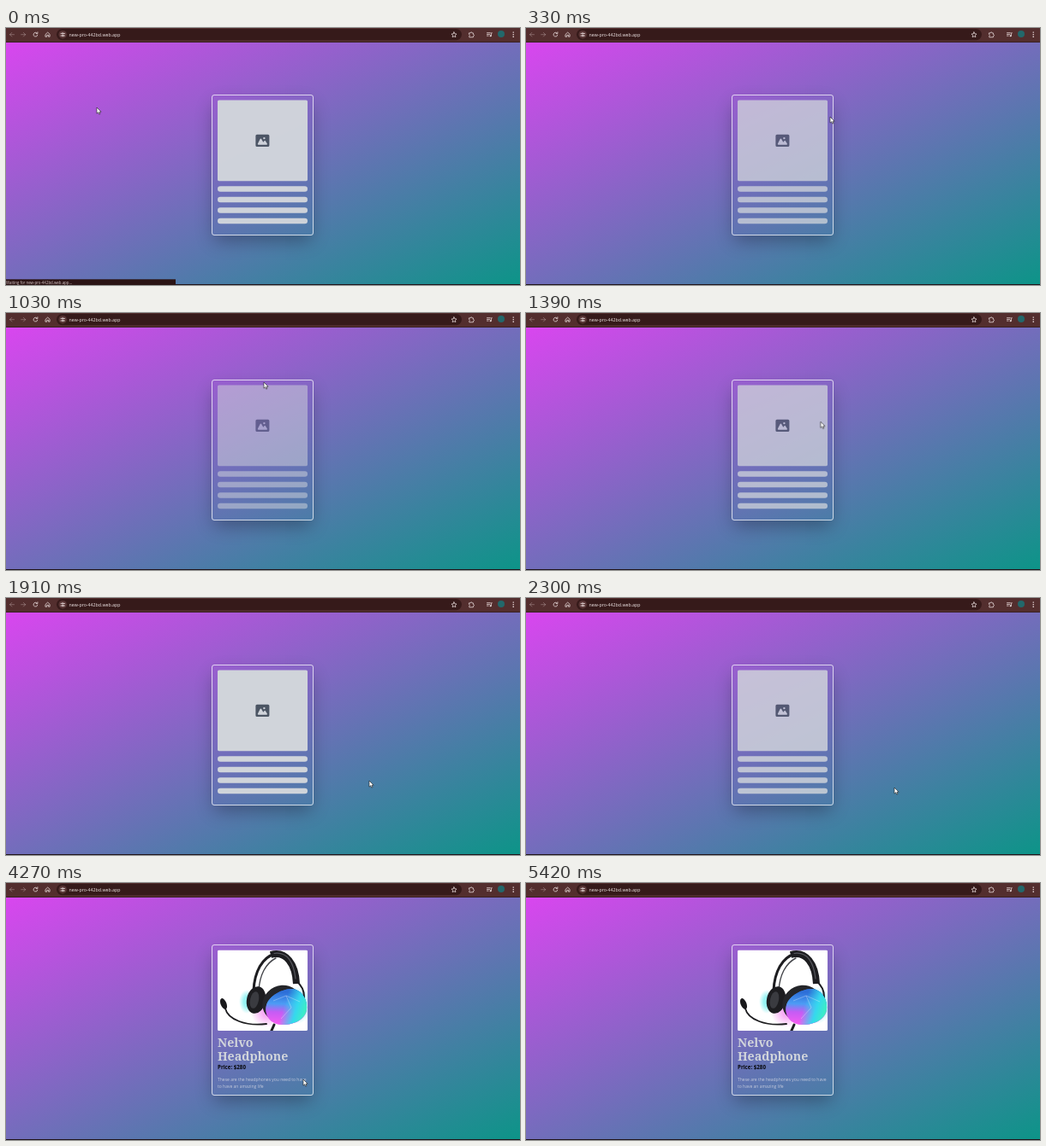
An HTML page that plays this animation: 600 px wide and 301 px high, repeating every 5.45 s.

```html
<!DOCTYPE html>
<html lang="en">
<head>
<meta charset="utf-8">
<title>Product card loading</title>
<style>
  :root { --loop: 5450ms; }
  html, body { margin: 0; width: 100%; height: 100%; overflow: hidden; }
  body { position: relative; background: #20141a; }
  svg { position: absolute; left: 0; top: 0; width: 600px; height: 301px; }
  text { font-family: "Open Sans", "Noto Sans", sans-serif; white-space: pre; }

  .page {
    position: absolute; left: 0; top: 16.5px; width: 600px; height: 283.5px;
    background: linear-gradient(to bottom right, #d946ef, #0d9488);
  }
  .card {
    position: absolute; left: 240.3px; width: 118.4px; box-sizing: border-box;
    border: 1px solid rgba(255, 255, 255, .72); border-radius: 3px;
    box-shadow: 0 9px 20px -3px rgba(0, 0, 0, .3);
  }
  .card.empty { top: 78px; height: 164.5px; }
  .card.full { top: 71.5px; height: 177px; }

  .loading { animation: loading var(--loop) step-end infinite; }
  .loaded { animation: loaded var(--loop) step-end infinite; }
  .status { animation: status var(--loop) step-end infinite; }
  .pulse { animation: pulse var(--loop) cubic-bezier(.4, 0, .6, 1) infinite; }
  .photo { animation: reveal var(--loop) steps(5, jump-both) infinite; }
  .cursor { animation: move var(--loop) ease-in-out infinite; }

  @keyframes loading { 0% { visibility: visible; } 43.85%, 100% { visibility: hidden; } }
  @keyframes loaded { 0% { visibility: hidden; } 43.85%, 100% { visibility: visible; } }
  @keyframes status { 0% { visibility: visible; } 2.75%, 100% { visibility: hidden; } }
  @keyframes pulse {
    0% { opacity: .98; animation-timing-function: cubic-bezier(.25, .15, .6, 1); }
    16.5% { opacity: .5; }
    34.86% { opacity: 1; }
    53.2%, 100% { opacity: .5; }
  }
  @keyframes reveal {
    0%, 53.94% { clip-path: inset(0 0 100% 0); }
    58.8%, 100% { clip-path: inset(0 0 0 0); }
  }
  @keyframes move {
    0%, 1.1% { transform: translate(106px, 93px); }
    6.05%, 7.7% { transform: translate(355px, 104px); }
    18.9% { transform: translate(301px, 81px); }
    35.05% { transform: translate(424px, 214px); }
    42.2% { transform: translate(430px, 222px); }
    53.2% { transform: translate(470px, 305px); }
    53.3%, 66.8% { transform: translate(425px, 305px); }
    71.56% { transform: translate(395px, 150px); }
    76.7% { transform: translate(349px, 226px); }
    78.35% { transform: translate(347px, 230px); }
    86.2%, 100% { transform: translate(360px, -14px); }
  }

  .bar-icons { fill: none; stroke: #e8dada; stroke-width: .8; stroke-linecap: round; stroke-linejoin: round; }
  .dim { opacity: .4; }
  .solid { fill: #e8dada; stroke: none; }
  .title { font: bold 14.2px "Noto Serif", "DejaVu Serif", serif; fill: #d1d5db; }
  .price { font-size: 6.2px; font-weight: 700; fill: #08080c; }
  .note { font-size: 5px; fill: #c3c9dc; }
</style>
</head>
<body>
<div class="page"></div>
<div class="card empty loading"></div>
<div class="card full loaded"></div>

<svg viewBox="0 0 600 301">
  <defs>
    <linearGradient id="shell" x1=".45" y1="0" x2=".4" y2="1">
      <stop offset=".1" stop-color="#2d6fd8"/>
      <stop offset=".42" stop-color="#4c9cf5"/>
      <stop offset=".65" stop-color="#c45cf4"/>
      <stop offset="1" stop-color="#f65cf0"/>
    </linearGradient>
    <linearGradient id="side" x1=".45" y1=".45" x2="1" y2=".6">
      <stop offset="0" stop-color="#35d8ee" stop-opacity="0"/>
      <stop offset=".55" stop-color="#35d8ee"/>
      <stop offset="1" stop-color="#3ff0c0"/>
    </linearGradient>
    <radialGradient id="cyanGlow">
      <stop offset=".4" stop-color="#7df0f0" stop-opacity=".8"/>
      <stop offset="1" stop-color="#7df0f0" stop-opacity="0"/>
    </radialGradient>
    <radialGradient id="pinkGlow">
      <stop offset=".3" stop-color="#f79af2" stop-opacity=".8"/>
      <stop offset="1" stop-color="#f79af2" stop-opacity="0"/>
    </radialGradient>
    <clipPath id="frame"><rect x="247" y="78.5" width="105" height="94.5" rx="1.6"/></clipPath>
  </defs>

  <!-- browser bar -->
  <rect width="600" height="16.5" fill="#532e2e"/>
  <rect x="59" y="1" width="473" height="13.2" rx="6.6" fill="#361a1a"/>
  <circle cx="66.2" cy="7.7" r="4.8" fill="#573434"/>
  <text x="73.6" y="9.7" font-size="5.25" fill="#f3eaea">new-pro-442bd.web.app</text>
  <g class="bar-icons">
    <path class="dim" d="M9.5 7.7H4.5M6.8 5.4 4.5 7.7 6.8 10M17.7 7.7h5M20.4 5.4l2.3 2.3-2.3 2.3"/>
    <path d="M36.8 8.2A2.4 2.4 0 1 1 36 5.8M36.9 4.8v1.8h-1.8"/>
    <path d="M46.3 7.3 48.7 5.1 51.1 7.3V10.2H49.6V8.3H47.8V10.2H46.3Z"/>
    <path d="M64 6.4h1.2M67.4 6.4h1.3M63.9 9h1.3M67.2 9h1.3"/>
    <circle cx="66.2" cy="6.4" r=".8"/><circle cx="66.2" cy="9" r=".8"/>
    <path d="M523 4.9l.9 1.9 2.1.3-1.5 1.5.3 2.1-1.8-1-1.8 1 .3-2.1-1.5-1.5 2.1-.3Z"/>
    <path d="M540.8 5.9h1.4a1 1 0 0 1 2 0h1.2v1.6a1 1 0 0 1 0 2v1.3h-4.6V9.2a1 1 0 0 0 0-1.7Z"/>
    <path d="M561.5 5.7h3.8M561.5 7.4h3.2M561.5 9.1h1.7M566.4 9.2V5.8h1"/>
    <circle class="solid" cx="565.6" cy="9.3" r="1"/>
    <path class="solid" d="M591.6 4.4h1.3v1.3h-1.3ZM591.6 7h1.3v1.3h-1.3ZM591.6 9.6h1.3v1.3h-1.3Z"/>
  </g>
  <circle cx="578" cy="7" r="4" fill="#23686b"/>

  <!-- placeholder -->
  <g class="loading">
    <g class="pulse" fill="#d1d5db">
      <rect x="247" y="84.5" width="105" height="94.7" rx="1.6"/>
      <rect x="247" y="185.2" width="105" height="6.5" rx="3.25"/>
      <rect x="247" y="197.8" width="105" height="6.5" rx="3.25"/>
      <rect x="247" y="210.3" width="105" height="6.5" rx="3.25"/>
      <rect x="247" y="222.8" width="105" height="6.5" rx="3.25"/>
      <path fill="#4b5563" fill-rule="evenodd" transform="translate(291.4 124.7) scale(.8)"
        d="M18 0H2a2 2 0 0 0-2 2v14a2 2 0 0 0 2 2h16a2 2 0 0 0 2-2V2a2 2 0 0 0-2-2ZM12.5 4a1.5 1.5 0 1 1 0 3 1.5 1.5 0 0 1 0-3ZM16.9 14.5A1 1 0 0 1 16 15H4a1 1 0 0 1-.9-1.4l3.5-7a1 1 0 0 1 1.8-.1l2.7 4.8 1.6-1.9a1 1 0 0 1 1.6.1l2.5 4a1 1 0 0 1 .1 1Z"/>
    </g>
  </g>

  <!-- product -->
  <g class="loaded">
    <g class="photo">
      <g clip-path="url(#frame)">
        <rect x="247" y="78.5" width="105" height="94.5" fill="#fff"/>
        <ellipse cx="339" cy="143" rx="19" ry="22" fill="url(#cyanGlow)"/>
        <ellipse cx="305" cy="152" rx="19" ry="17" fill="url(#pinkGlow)"/>
        <ellipse cx="281" cy="139" rx="9" ry="14" fill="url(#cyanGlow)"/>
        <g fill="none" stroke="#1d1d20" stroke-linecap="round">
          <path d="M289 126C290 104 299 87 314 83" stroke-width="3"/>
          <path d="M295 126C296 108 303 94 315 88" stroke-width="1.4" stroke="#44454a"/>
          <path d="M309 84C327 79 338 95 339 118" stroke-width="8" stroke-linecap="butt"/>
          <path d="M313 82.5C329 80 336 94 338 112" stroke-width="1.2" stroke="#55565c"/>
          <path d="M339 115C348 122 350 133 346 146" stroke-width="2"/>
          <path d="M256 147C259 160 280 168 304 165" stroke-width="1.8"/>
          <path d="M313 166 309 175" stroke-width="3"/>
        </g>
        <ellipse cx="254" cy="141.5" rx="3.4" ry="6.8" transform="rotate(-22 254 141.5)" fill="#18181b"/>
        <ellipse cx="292" cy="137" rx="11" ry="16" transform="rotate(12 292 137)" fill="#1d1d20"/>
        <ellipse cx="290" cy="137" rx="5" ry="10" transform="rotate(12 290 137)" fill="#3a3b40"/>
        <ellipse cx="322" cy="141" rx="23" ry="21" transform="rotate(-25 322 141)" fill="#242529"/>
        <path id="cup" d="M304 143C307 132 322 124 334 124C345 125 352 136 351 148C350 158 339 166 323 166C309 166 301 155 304 143Z" fill="url(#shell)"/>
        <use href="#cup" style="fill:url(#side)"/>
        <path d="M304 143C307 132 322 124 334 124C345 125 352 136 351 148C350 158 339 166 323 166C309 166 301 155 304 143Z" fill="url(#side)"/>
        <path d="M312 138 327 132 333 146 321 159M327 132 343 139" fill="none" stroke="#fff" stroke-opacity=".3"/>
      </g>
    </g>
    <text class="title" x="247" y="192">Nelvo</text>
    <text class="title" x="247" y="207.5">Headphone</text>
    <text class="price" x="247" y="217.6">Price: $280</text>
    <text class="note" x="247" y="232.4">These are the headphones you need to have</text>
    <text class="note" x="247" y="240.4">to have an amazing life</text>
  </g>

  <g class="status">
    <rect y="294.3" width="198" height="7" fill="#2b1415"/>
    <text x="0" y="299.8" font-size="4.4" fill="#d9c9c9">Waiting for new-pro-442bd.web.app...</text>
  </g>

  <path class="cursor" d="M0 0V7.2L1.7 5.7 2.8 8.1 4 7.5 2.9 5.2H5.1Z" fill="#fff" stroke="#1a1a1a" stroke-width=".6"/>
</svg>
</body>
</html>
```
